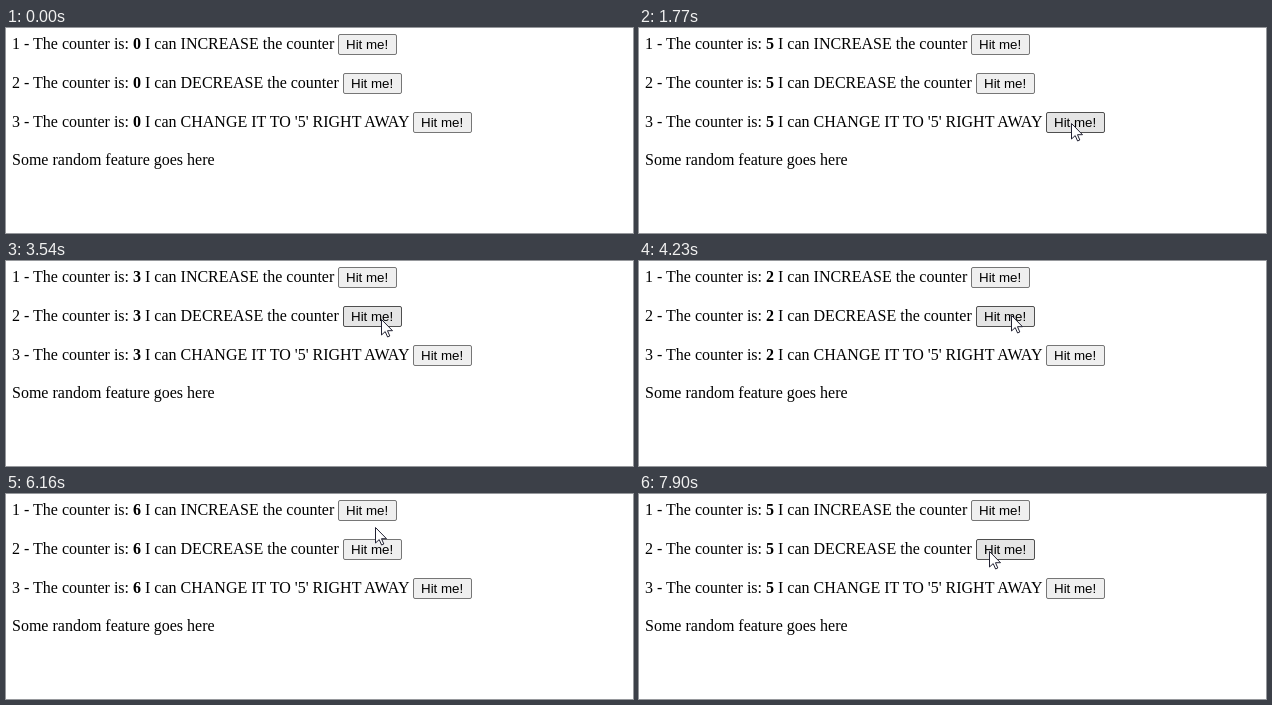
Animation of 627x205 px, one loop 8 s. Source, as an HTML page:

```html
<!DOCTYPE html>
<html lang="en">
<head>
<meta charset="utf-8">
<title>Counter buttons</title>
<style>
html, body { margin: 0; width: 100%; height: 100%; overflow: hidden; background: #fff; }
svg { display: block; }
text { font: 16px "Liberation Serif", serif; white-space: pre; }
.count { font-weight: bold; }
.button rect { fill: #efefef; stroke: #767676; }
.button text { font: 13.3333px "Liberation Sans", sans-serif; }
.button.hover rect { fill: #e5e5e5; stroke: #4f4f4f; }
.button.active rect { fill: #f5f5f5; stroke: #8d8d8d; }
</style>
</head>
<body>
<svg width="627" height="205">
  <g id="rows"></g>
  <text x="6" y="137">Some random feature goes here</text>
  <path id="cursor" d="M.5 .5V16L4.2 12.6 6.6 18 8.8 17 6.5 11.7H11.5Z" fill="#fff" stroke="#223"/>
</svg>
<script>
const LOOP = 8000, PRESS = 90, ROW = 39, HEIGHT = 21;

const rows = [
  { label: 'INCREASE the counter', x: 332, apply: n => n + 1 },
  { label: 'DECREASE the counter', x: 337, apply: n => n - 1 },
  { label: "CHANGE IT TO '5' RIGHT AWAY", x: 407, apply: () => 5 },
].map((row, i) => ({ ...row, y: 6 + i * ROW, w: 58 }));
const [increase, decrease, setFive] = rows;

// The pointer rests between moves.
const entry = { x: 448, y: 178 };
const moves = [
  { start: 150, end: 1040, x: 422, y: 124 },
  { start: 1040, end: 1350, x: 432, y: 95 },
  { start: 2290, end: 2810, x: 378, y: 61 },
  { start: 2810, end: 4200, x: 372, y: 55 },
  { start: 4200, end: 4460, x: 370, y: 20 },
  { start: 5960, end: 6400, x: 368, y: 50 },
  { start: 6860, end: 7430, x: 350, y: 57 },
];

const repeat = (row, first, times = 1, gap = 0) =>
  Array.from({ length: times }, (_, i) => ({ row, at: first + i * gap }));
const clicks = [
  ...repeat(setFive, 1600),
  ...repeat(decrease, 3150, 3, 350),
  ...repeat(increase, 4450, 4, 450),
  ...repeat(decrease, 6480),
];

document.getElementById('rows').innerHTML = rows.map(({ label, x, y, w }, i) => `
  <text x="6" y="${y + 15}">${i + 1} - The counter is: <tspan class="count">0</tspan> I can ${label}</text>
  <g class="button">
    <rect x="${x + .5}" y="${y + .5}" width="${w}" height="${HEIGHT - 1}" rx="1.5"/>
    <text x="${x + 8}" y="${y + 15}">Hit me!</text>
  </g>`).join('');

const cursor = document.getElementById('cursor');
const counts = document.querySelectorAll('.count');
const buttons = document.querySelectorAll('.button');

function pointerAt(t) {
  let { x, y } = entry;
  for (const move of moves) {
    const u = Math.min(1, Math.max(0, (t - move.start) / (move.end - move.start)));
    const ease = u * u * (3 - 2 * u);
    x += (move.x - x) * ease;
    y += (move.y - y) * ease;
  }
  return { x: Math.round(x), y: Math.round(y) };
}

function draw() {
  const t = performance.now() % LOOP;
  const tip = pointerAt(t);
  const count = clicks.filter(c => c.at <= t).reduce((n, c) => c.row.apply(n), 0);
  const pressed = clicks.some(c => t >= c.at - PRESS && t < c.at);

  cursor.style.display = t < moves[0].start ? 'none' : '';
  cursor.setAttribute('transform', `translate(${tip.x} ${tip.y})`);
  counts.forEach(c => { c.textContent = count; });
  rows.forEach(({ x, y, w }, i) => {
    const over = tip.x >= x && tip.x <= x + w && tip.y >= y && tip.y < y + HEIGHT;
    buttons[i].classList.toggle('hover', over);
    buttons[i].classList.toggle('active', over && pressed);
  });
  requestAnimationFrame(draw);
}
draw();
</script>
</body>
</html>
```
